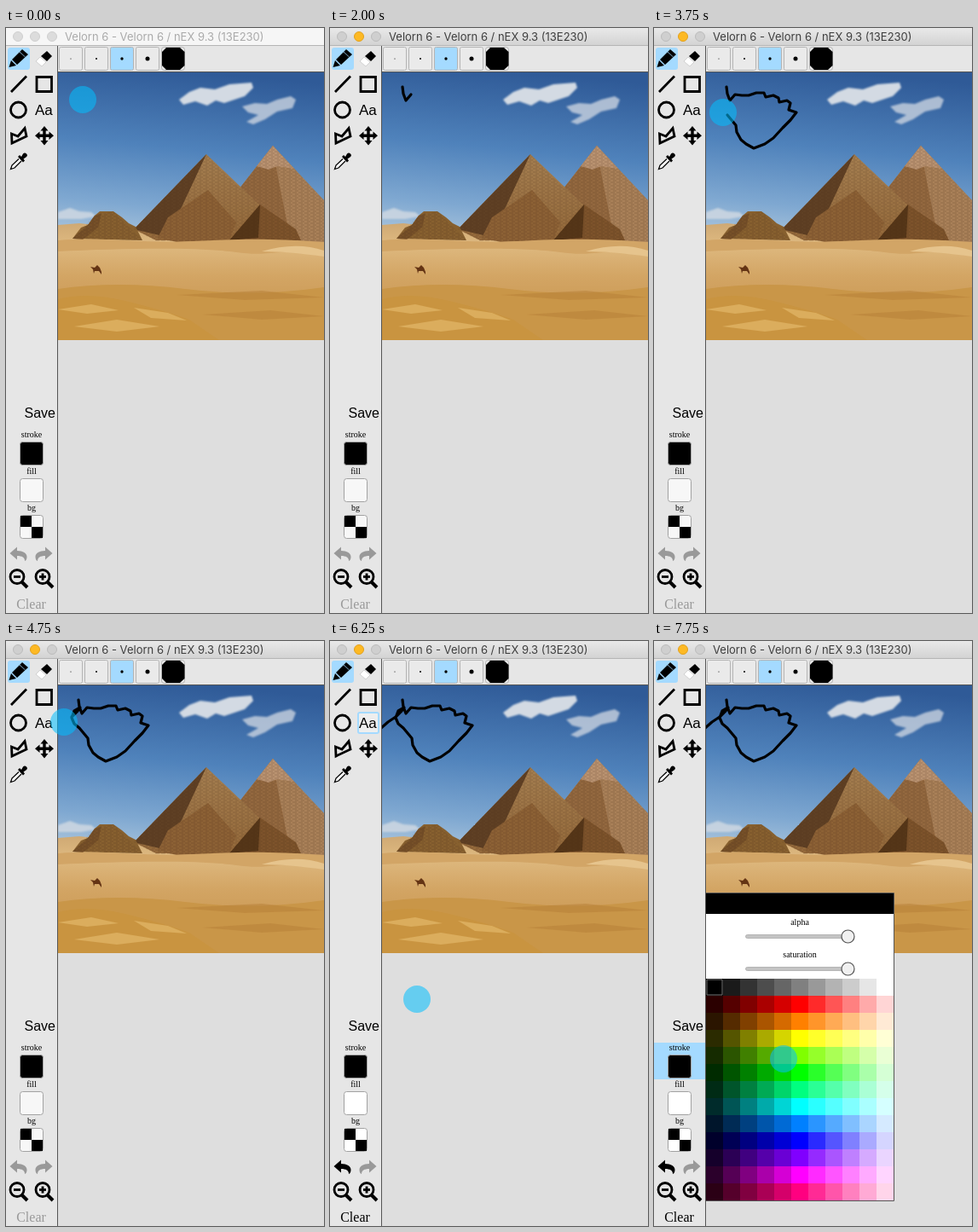
Animation of 373x686 px, one loop 8000 ms. Source, as an HTML page:

```html
<!DOCTYPE html>
<html lang="en">
<head>
<meta charset="utf-8">
<title>Drawing app</title>
<style>
html, body { margin: 0; width: 100%; height: 100%; overflow: hidden; background: #dedede; }
svg { display: block; width: 373px; height: 686px; }
text { font-family: "Liberation Serif", serif; font-size: 10px; text-anchor: middle; }
.sans { font-family: "Liberation Sans", sans-serif; font-size: 16px; text-anchor: start; }
.title { font: 13px Inter, sans-serif; text-anchor: start; fill: #aaa; }
.bar { fill: #f6f6f6; }
.lights { fill: #dcdcdc; stroke: #cfcfcf; }
.active .title { fill: #3e3e3e; }
.active .bar { fill: url(#bar); }
.active .lights { fill: #cfcfcf; stroke: #bcbcbc; }
.active .mid { fill: #fdb924; stroke: #e2a11c; }
.btn { fill: #eaeaea; stroke: #b4b4b4; }
.on { fill: #a4daff; }
.line { fill: none; stroke: #000; stroke-width: 2.8; }
.swatch { stroke: #a2a2a2; }
.paper { fill: #f7f7f7; }
.edited .paper { fill: #fff; }
.todo { fill: #999; }
.edited .undo { fill: #000; }
.hover, .popup { visibility: hidden; }
.hovering .hover, .picking .popup { visibility: visible; }
</style>
</head>
<body>
<svg id="app" viewBox="0 0 373 686">
<defs>
  <linearGradient id="bar" x2="0" y2="1"><stop stop-color="#e9e9e9"/><stop offset="1" stop-color="#d3d3d3"/></linearGradient>
  <linearGradient id="sky" x1=".55" y1="0" x2=".4" y2="1"><stop stop-color="#2f5a97"/><stop offset=".45" stop-color="#4f82bb"/><stop offset=".8" stop-color="#7fa8d1"/><stop offset="1" stop-color="#a9c4dc"/></linearGradient>
  <linearGradient id="sand" x2="0" y2="1"><stop stop-color="#cfa974"/><stop offset=".18" stop-color="#deb980"/><stop offset=".45" stop-color="#d3a564"/><stop offset="1" stop-color="#c38f47"/></linearGradient>
  <linearGradient id="lit" x2="0" y2="1"><stop stop-color="#a47e50"/><stop offset="1" stop-color="#94693a"/></linearGradient>
  <pattern id="bricks" width="7" height="4" patternUnits="userSpaceOnUse"><path d="M0 1H5M3 3H7" stroke="#3a2410" stroke-opacity=".22"/></pattern>
  <filter id="soft"><feGaussianBlur stdDeviation="1.3"/></filter>
  <clipPath id="page"><path d="M61 52H373V366H61Z"/></clipPath>
  <path id="back" d="M4.5 616L13 608.5V613C20 613 24.500 616 24.500 620C24.500 623 23.500 624.500 22 625C22 621 19 619 13 619V623.500Z"/>
  <g id="lens"><circle cx="13" cy="643.500" r="8" class="line" stroke-width="3"/><path d="M19 650L25 656" class="line" style="stroke-width:4"/><path d="M9 643.500H17" class="line"/></g>
</defs>

<rect width="373" height="686" fill="#dedede"/>
<rect y="20" width="373" height="32" fill="#e6e6e6"/>
<rect y="20" width="60" height="666" fill="#e6e6e6"/>

<g clip-path="url(#page)">
  <rect x="61" y="52" width="312" height="200" fill="url(#sky)"/>
  <g filter="url(#soft)" fill="#d3dae3">
    <path d="M203 84L215 75 228 70 245 72 262 66 288 64 290 70 280 80 268 84 256 88 246 85 236 91 222 86 208 90Z"/>
    <path d="M277 92L292 88 306 89 318 84 334 80 340 84 336 94 318 98 304 107 290 113 282 110 296 102 284 99Z" opacity=".75"/>
    <path d="M61 216L75 211 86 215 100 216 106 221 88 224 61 224Z" opacity=".8"/>
  </g>
  <path d="M61 231L86 229 150 236 373 232V366H61Z" fill="url(#sand)"/>
  <path d="M313 138L373 202V252H290L274 188Z" fill="#a98058"/>
  <path d="M313 138L274 188 290 207 330 230 318 170Z" fill="#93683f"/>
  <path d="M313 138L294 162 308 166 318 162 338 165Z" fill="#b99270"/>
  <path d="M235 148L300 210 290 249H176L150 236Z" fill="url(#lit)"/>
  <path d="M235 148L150 236 180 243 205 212Z" fill="#5f4024"/>
  <path d="M237 190L190 222 178 246 200 251 262 249 270 228Z" fill="#8c6135"/>
  <path d="M298 207L262 249H346L340 236Z" fill="#7d532b"/>
  <path d="M298 207L262 249 296 246Z" fill="#553618"/>
  <path d="M78 247L88 234 96 231 104 220 110 215H126L136 222 144 229 152 233 160 249Z" fill="#87602f"/>
  <path d="M78 247L96 231 104 220 112 217 108 234 90 248Z" fill="#765028"/>
  <path d="M313 138L373 202V250H176L150 236 235 148 274 188ZM78 247L104 220 126 215 160 249Z" fill="url(#bricks)"/>
  <path d="M61 249C120 245 160 253 220 250S310 247 373 251V264C330 257 310 269 270 263S140 258 61 262Z" fill="#d2a566"/>
  <path d="M300 262Q340 250 373 261V268Q330 262 300 262Z" fill="#e6c48d"/>
  <path d="M61 306Q130 296 210 306T373 304V366H61Z" fill="#c99648"/>
  <path d="M61 318Q95 309 140 320T215 342L250 366H61Z" fill="#c99440"/>
  <path d="M61 330L100 324 132 331 95 335ZM80 350L130 342 180 350 130 356ZM150 328L190 334 212 343 170 340Z" fill="#dbad5d"/>
  <path d="M200 313L300 308 373 316 280 319ZM230 336L310 331 373 338 300 342Z" fill="#b98239" opacity=".55"/>
  <path d="M99 280L104 281 107 278 110 281 112 286V289L109 285 104 285 103 288 102 283Z" fill="#643414"/>
  <polyline id="ink" class="line" style="stroke-width:3.200" stroke-linecap="round" stroke-linejoin="round"/>
</g>

<path d="M60.500 20V686M60 51.500H373" stroke="#555" fill="none"/>

<rect class="bar" width="373" height="20"/>
<path d="M0 20.500H373" stroke="#b5b5b5"/>
<g class="lights"><circle cx="14" cy="10" r="5.500"/><circle class="mid" cx="34" cy="10" r="5.500"/><circle cx="54" cy="10" r="5.500"/></g>
<text class="title" x="69" y="15">Velorn 6 - Velorn 6 / nEX 9.3 (13E230)</text>

<g id="sizes"></g>
<rect class="btn" x="182.500" y="22.500" width="27" height="27" rx="3"/>
<path d="M188 23H204L209.500 28V44L204 49H188L183 44V28Z"/>

<rect class="on" x="2" y="23" width="26" height="26" rx="3"/>
<path d="M19 25L26 31 13 43 7 37ZM6 38L12 44 3.500 46Z"/>
<path d="M16 28L22.500 34" stroke="#a4daff" stroke-width=".8"/>
<path d="M48 27L54 33 48 39 41 33Z"/><path d="M40 34L47 40 42 45 35 39Z" fill="#fff" stroke="#bbb" stroke-width=".6"/>
<path class="line" d="M6 75L24 56.500M36 57.500H53.500V74.500H36Z"/>
<circle class="line" cx="14.500" cy="96" r="9"/>
<g class="hover"><rect x="33" y="84" width="24" height="24" rx="2" fill="#eee" stroke="#a4daff" stroke-width="2"/></g>
<text class="sans" x="34" y="102" style="font-size:17px">Aa</text>
<path class="line" d="M7 135L6.500 124 14 127 22 117.500 24 127Z"/>
<path d="M45 115L49.500 120.500H46.700V124.500H50.500V121.500L56 126.200 50.500 131V128H46.700V132H49.500L45 137.500 40.500 132H43.300V128H39.500V131L34 126.200 39.500 121.500V124.500H43.300V120.500H40.500Z"/>
<path d="M14 151L16 149 18 151 20 147.500Q22 145.500 24 147.500T23.500 151.500L20.500 153.500 22 155.500 20 157.500Z"/>
<path d="M15 153.500L7 161 5.500 165.500 10 164 18 156" fill="#fff" stroke="#000" stroke-width="1.300"/>

<text class="sans" x="21.500" y="457">Save</text>
<rect class="popup on" y="471" width="60" height="43"/>
<text x="30" y="480">stroke</text>
<rect class="swatch" x="16.500" y="485.500" width="27" height="27" rx="3"/>
<text x="30" y="523">fill</text>
<rect class="swatch paper" x="16.500" y="528.500" width="27" height="27" rx="3"/>
<text x="30" y="566">bg</text>
<rect class="swatch paper" x="16.500" y="571.500" width="27" height="27" rx="3"/>
<path d="M17 572H30V585H17ZM30 585H43V598H30Z"/>
<use href="#back" class="todo undo"/>
<use href="#back" class="todo" transform="matrix(-1 0 0 1 59 0)"/>
<use href="#lens"/><use href="#lens" x="30"/><path class="line" d="M43 639.500V647.500"/>
<text class="todo undo" x="29.500" y="681" style="font-size:16px">Clear</text>

<g class="popup">
  <rect x="61" y="296" width="220" height="360" fill="#fff"/>
  <rect x="61" y="296" width="220" height="24"/>
  <text x="171" y="333">alpha</text>
  <text x="171" y="371">saturation</text>
  <g fill="#c4c4c4" stroke="#aaa" stroke-width=".8"><rect x="107.500" y="344.500" width="120" height="4" rx="2"/><rect x="107.500" y="382.500" width="120" height="4" rx="2"/></g>
  <g fill="#f0f0f0" stroke="#555" stroke-width="1.200"><circle cx="227.500" cy="346.500" r="7.500"/><circle cx="227.500" cy="384.500" r="7.500"/></g>
  <g id="palette" shape-rendering="crispEdges"></g>
  <path d="M62 397H80V415H62Z" fill="none" stroke="#777"/>
  <path d="M60.500 295.500H281.500V656.500H60.500Z" fill="none" stroke="#555"/>
</g>

<circle id="touch" r="16" fill="rgb(2,192,255)" fill-opacity=".55"/>
<circle id="ring" fill="none" stroke="#5ccdf0" stroke-width="3"/>
</svg>

<script>
const $ = id => document.getElementById(id);
const TICK = 250, LOOP = 8000;

function add(parent, tag, attrs) {
  const el = document.createElementNS("http://www.w3.org/2000/svg", tag);
  for (const k in attrs) el.setAttribute(k, attrs[k]);
  $(parent).appendChild(el);
}
function set(id, attrs) {
  for (const k in attrs) $(id).setAttribute(k, attrs[k]);
}

[0.6, 1, 1.7, 2.5].forEach((r, i) => {
  add("sizes", "rect", { class: i === 2 ? "btn on" : "btn", x: 62.5 + 30 * i, y: 22.5, width: 27, height: 27, rx: 2 });
  add("sizes", "circle", { cx: 76 + 30 * i, cy: 36, r });
});

for (let row = 0; row < 13; row++)
  for (let col = 0; col < 11; col++)
    add("palette", "rect", {
      x: 61 + 20 * col, y: 396 + 20 * row, width: 20, height: 20,
      fill: row ? `hsl(${(row - 1) * 30},100%,${(col + 1) * 100 / 12}%)` : `hsl(0,0%,${col * 10}%)`
    });

const ink = ("85,69 86,77 89,85 95,78 103,79 111,79 120,76 129,76 131,81 140,79 146,82 147,87 " +
  "156,85 160,88 158,96 167,99 160,108 151,117 140,129 130,136 117,141 108,136 102,131 97,122 " +
  "96,114 86,102 80,97 77,90 80,82 87,78 84,82 77,89 68,95 60,102").split(" ");

// Points drawn on each tick, from tick 7 on
const drawn = [2, 4, 7, 10, 14, 18, 20, 23, 26, 27, 29, 30, 32, 34];

// Finger position by tick; a missing tick means no finger
const finger = {
  0: [90, 84], 1: [90, 84], 2: [90, 84], 3: [90, 84], 7: [84, 75],
  9: [112, 78], 10: [134, 80], 11: [150, 95], 12: [142, 120],
  13: [117, 134], 14: [99, 122], 15: [81, 99], 16: [73, 90], 17: [80, 78],
  18: [84, 75], 19: [68, 95], 20: [42, 106], 21: [21, 170], 22: [26, 240],
  23: [55, 310], 24: [88, 370], 25: [102, 420], 26: [66, 470], 27: [21, 498],
  28: [21, 514], 31: [152, 490]
};
// Release ripples: x, y, radius, opacity
const ripple = { 4: [90, 84, 20, 0.4], 5: [90, 84, 31, 0.15], 29: [21, 514, 20, 0.38] };

function draw(n) {
  const app = $("app").classList;
  app.toggle("active", n >= 3);
  app.toggle("edited", n >= 20);
  app.toggle("hovering", n >= 20 && n < 30);
  app.toggle("picking", n >= 30);

  const count = n < 7 ? 0 : drawn[Math.min(n - 7, drawn.length - 1)];
  set("ink", { points: ink.slice(0, count).join(" ") });

  const [cx, cy] = finger[n] || [-99, -99];
  set("touch", { cx, cy });
  const [rx, ry, r, opacity] = ripple[n] || [-99, -99, 1, 0];
  set("ring", { cx: rx, cy: ry, r, opacity });
}

let start, last = -1;
function frame(now) {
  start ??= now;
  const n = Math.floor((now - start) % LOOP / TICK);
  if (n !== last) draw(last = n);
  requestAnimationFrame(frame);
}
draw(0);
requestAnimationFrame(frame);
</script>
</body>
</html>
```
